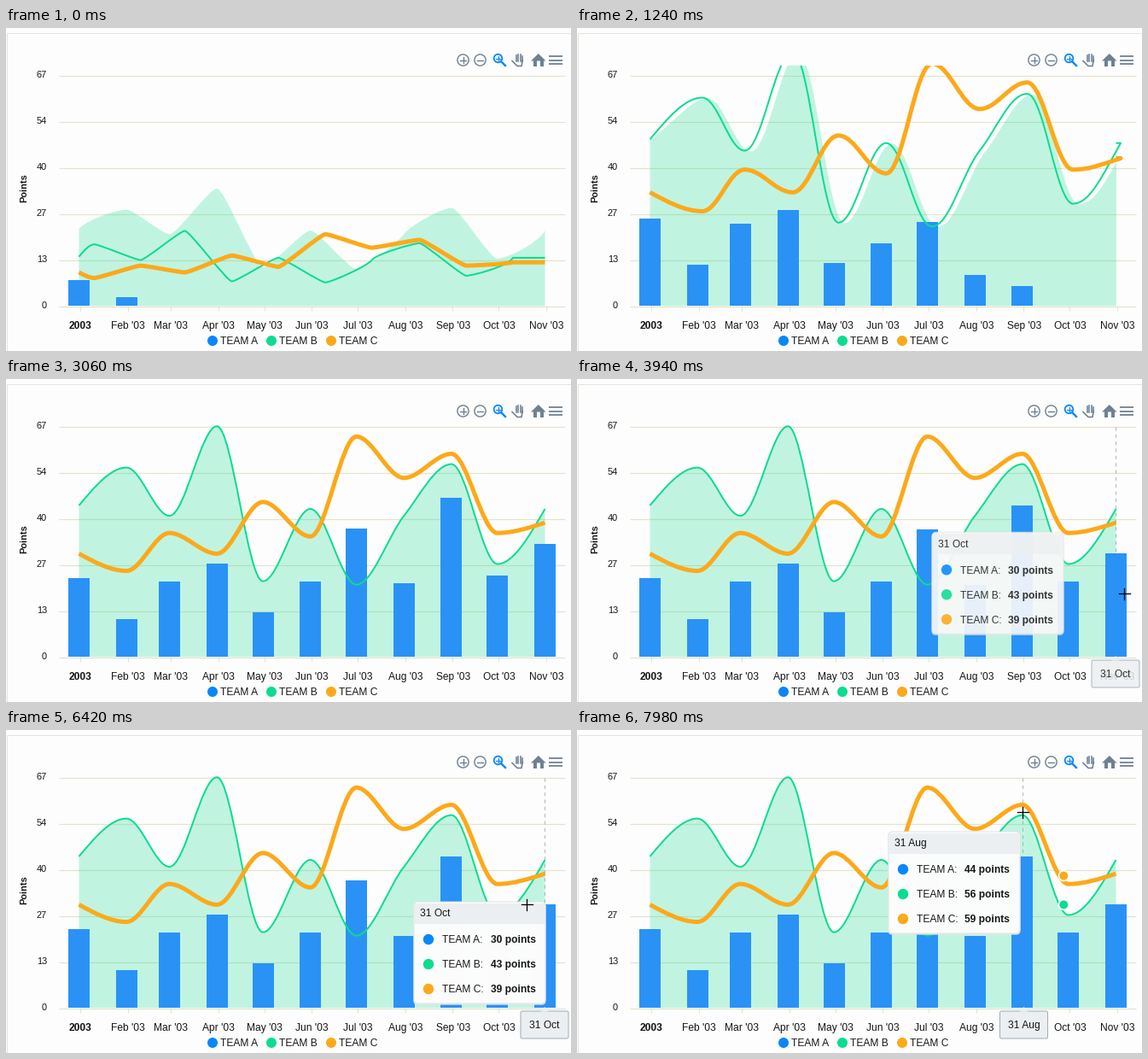
Recreate the animation shown at these times as a matplotlib script. Size 662 by 378 pixels, loop 8 s.

```python
import numpy as np
import matplotlib
matplotlib.rcParams["toolbar"] = "None"
import matplotlib.pyplot as plt
from matplotlib.animation import FuncAnimation
from matplotlib.patches import Circle, FancyBboxPatch, PathPatch, Polygon, Rectangle
from matplotlib.path import Path
from matplotlib.transforms import Affine2D

W, H, DPI = 662, 378, 100
TICK, LOOP = 20, 8000
PX = 72 / DPI
plt.rcParams["font.family"] = "Liberation Sans"

BG, INK, GRID = "#fdfdfd", "#151515", "#e4e4cc"
BLUE, GREEN, ORANGE = COLORS = ("#0787fb", "#0cdc90", "#fca91a")
BAR, ICON = "#2a92f5", "#6e8192"
PANEL, HEAD, EDGE = "#fdfdfd", "#eceff1", "#9dadb8"
NAMES = ("TEAM A", "TEAM B", "TEAM C")

A = np.array([23, 11, 22, 27, 13, 22, 37, 21, 44, 22, 30])
B = np.array([44, 55, 41, 67, 22, 43, 21, 41, 56, 27, 43])
C = np.array([30, 25, 36, 30, 45, 35, 64, 52, 59, 36, 39])
MONTHS = ["2003"] + [m + " '03" for m in "Feb Mar Apr May Jun Jul Aug Sep Oct Nov".split()]
DAYS = [28 + (m + m // 8) % 2 + 2 % m + 2 * (1 // m) for m in range(1, 11)]
X = 85.5 + 1.796 * np.concatenate([[0], np.cumsum(DAYS)])
ZERO, UNIT = 325.3, 270 / 67

fig = plt.figure(figsize=(W / DPI, H / DPI), dpi=DPI, facecolor=BG)
ax = fig.add_axes([0, 0, 1, 1])
ax.set_xlim(0, W)
ax.set_ylim(H, 0)
ax.axis("off")


def text(x, y, s, px=12, ha="left", bold=False, z=2, **kw):
    return ax.text(x, y + 0.36 * px, s, fontsize=px * PX, ha=ha, va="baseline", color=INK,
                   weight="bold" if bold else "normal", zorder=z, **kw)


def line(xs, ys, color, px, z=1, **kw):
    return ax.plot(xs, ys, color=color, lw=px * PX, zorder=z, **kw)[0]


def dot(x, y, r, color, z=2, **kw):
    return ax.add_patch(Circle((x, y), r, fc=color, zorder=z, **kw))


def plus(x, y, r, color, px, z=1):
    return (line([x - r, x + r], [y, y], color, px, z),
            line([x, x], [y - r, y + r], color, px, z))


def height(v):
    return ZERO - UNIT * np.asarray(v, float)


# ---- easing -------------------------------------------------------------
def back_out(u):
    n = np.clip(u, 0, 1) - 1
    s = 1.70158
    return n * n * ((s + 1) * n + s) + 1


S = np.linspace(0, 1, 101)
EASE_X = 0.75 * S * (1 - S) ** 2 + 0.75 * S ** 2 * (1 - S) + S ** 3
EASE_Y = 0.3 * S * (1 - S) ** 2 + 3 * S ** 2 * (1 - S) + S ** 3


def ease(n, start, length=9.5):
    return np.interp((n - start) / length, EASE_X, EASE_Y)


def mix(a, b, k):
    return np.asarray(a, float) * (1 - k) + np.asarray(b, float) * k


# ---- curves -------------------------------------------------------------
def spline(ys):
    """Bezier vertices of a monotone cubic through the points."""
    h = np.diff(X)
    s = np.diff(ys) / h
    m = np.zeros(len(X))
    p = (s[:-1] * h[1:] + s[1:] * h[:-1]) / (h[1:] + h[:-1])
    low = np.minimum(np.minimum(abs(s[:-1]), abs(s[1:])), abs(p) / 2)
    m[1:-1] = (np.sign(s[:-1]) + np.sign(s[1:])) * low
    m[0] = (3 * s[0] - m[1]) / 2
    m[-1] = (3 * s[-1] - m[-2]) / 2
    pts = [(X[0], ys[0])]
    for i, d in enumerate(h):
        pts += [(X[i] + d / 3, ys[i] + m[i] * d / 3),
                (X[i + 1] - d / 3, ys[i + 1] - m[i + 1] * d / 3),
                (X[i + 1], ys[i + 1])]
    return np.array(pts)


def flat(xs):
    """Bezier vertices of a baseline polyline through xs."""
    pts = [(xs[0], ZERO)]
    for a, b in zip(xs, xs[1:]):
        pts += [(a, ZERO), (b, ZERO), (b, ZERO)]
    return np.array(pts)


def bezier(pts, base=()):
    codes = [Path.MOVETO] + [Path.CURVE4] * (len(pts) - 1) + [Path.LINETO] * len(base)
    return Path(np.vstack([pts, *base]), codes)


def padded(pts):
    return np.vstack([pts, [pts[-1]] * 3])


AREA_TO, AREA_FROM = spline(height(B)), flat(X)
# lines start one point behind, so they slide to the right as they rise
LINE_FROM = flat(np.concatenate([[X[0]], X]))
LINES_TO = [padded(spline(height(v))) for v in (B, C)]


def area_path(e):
    pts = mix(AREA_FROM, AREA_TO, e)
    pts[1:, 0] += 130 * max(e - 1, 0)
    return bezier(pts, [(pts[-1, 0], ZERO), (X[0], ZERO)])


# ---- fixed parts --------------------------------------------------------
line([0.5, 0.5, 661.5, 661.5], [H, 5.5, 5.5, H], "#e4e4dc", 1)
rows = 55.5 + 54 * np.arange(6)
ax.hlines(rows, 62, 655, GRID, lw=1.2 * PX, zorder=1)
ax.vlines(X + 1.5, ZERO, ZERO + 6, GRID, lw=PX, zorder=1)
for i, y in enumerate(rows):
    text(48, y - 1, str(int(67 - 13.4 * i + 0.5)), 11, "right")
for i, (x, s) in enumerate(zip(X, MONTHS)):
    text(x + 1.8, 347.8, s, 12, "center", bold=i == 0)
ax.text(21.5, 187, "Points", fontsize=11 * PX, weight="bold", color=INK, rotation=90,
        ha="center", va="center")
for x, color, s in zip((242, 311, 381), COLORS, NAMES):
    dot(x, 366, 6, color, lw=0)
    text(x + 9, 366, s)


def toolbar(y=37.5):
    for x in (535.5, 555.5):
        dot(x, y, 6.6, "none", ec=ICON, lw=1.4 * PX)
        line([x - 3.5, x + 3.5], [y, y], ICON, 1.4)
    line([535.5] * 2, [y - 3.5, y + 3.5], ICON, 1.4)
    dot(576.5, y - 2, 4.8, "none", ec=BLUE, lw=1.8 * PX)
    plus(576.5, y - 2, 2.5, BLUE, 1.2)
    line([580, 585], [y + 1.5, y + 6.5], BLUE, 2.4)
    # hand: four fingers over an open palm
    for i in range(4):
        x = 597.5 + 2.6 * i
        line([x, x], [y - 7 + (i - 1.3) ** 2 * 0.9, y + 1], ICON, 1.6)
    line([593, 599, 604, 605.3], [y + 1, y + 7, y + 7, y], ICON, 1.6)
    # home: roof, walls and door
    ax.add_patch(Polygon([(615, y + 1), (623.8, y - 7.5), (632.5, y + 1)], fc=ICON, lw=0))
    for x in (617.5, 625.8):
        ax.add_patch(Rectangle((x, y), 4.2, 7.5, fc=ICON, lw=0))
    ax.hlines(y + np.array([-4.7, 0, 4.7]), 636, 651.5, ICON, lw=1.8 * PX)


toolbar()

# ---- series -------------------------------------------------------------
hair = line([0, 0], [56, ZERO], "#b6b6bc", 1, 1.5, dashes=(3 / PX, 3 / PX))
area = ax.add_patch(PathPatch(area_path(1), fc=GREEN, alpha=0.25, lw=0, zorder=3))
area.set_clip_path(Rectangle((85, 44), 547, 282, transform=ax.transData))
bars = [ax.add_patch(Rectangle((x - 12.5, ZERO), 25, 0, fc=BAR, lw=0, zorder=4)) for x in X]
plot_box = Rectangle((60, 44), 600, 290, transform=ax.transData)
curves = []
for color, px in ((GREEN, 2), (ORANGE, 5)):
    p = ax.add_patch(PathPatch(bezier(LINES_TO[0]), fc="none", ec=color, lw=px * PX, zorder=5,
                               capstyle="butt", joinstyle="round"))
    p.set_clip_path(plot_box)
    curves.append(p)
markers = [dot(0, 0, 5.8, c, 6, ec="white", lw=1.6 * PX) for c in (GREEN, ORANGE)]

# ---- tooltip and axis tag -----------------------------------------------
tip_at, tag_at = Affine2D(), Affine2D()
tip_tr, tag_tr = tip_at + ax.transData, tag_at + ax.transData


def box(x, y, w, h, r, z, tr, **kw):
    return ax.add_patch(FancyBboxPatch((x + r, y + r), w - 2 * r, h - 2 * r, zorder=z,
                                       boxstyle=f"round,pad={r}", transform=tr, **kw))


panels = [box(-0.6, 0.4, 155.2, 120.2, 5, 8, tip_tr, fc="#e4e8ea", lw=0),
          box(0, 0, 154, 119, 5, 8, tip_tr, fc=PANEL, ec="#e3e3e3", lw=PX),
          ax.add_patch(Rectangle((0.7, 1.5), 152.6, 24, fc=HEAD, lw=0, zorder=8.1,
                                 transform=tip_tr))]
head = text(7, 13, "", z=9, transform=tip_tr)
labels, values = [head], []
for i, color in enumerate(COLORS):
    y = 44 + 29 * i
    labels.append(dot(17, y, 6.2, color, 9, lw=0, transform=tip_tr))
    labels.append(text(33, y, NAMES[i] + ":", z=9, transform=tip_tr))
    values.append(text(89.5, y, "", bold=True, z=9, transform=tip_tr))
labels += values

tag_text = text(0, 345, "", 12, "center", z=7.5, transform=tag_tr)
tag = [box(-28, 329, 56, 32, 2, 7, tag_tr, fc=HEAD, ec=EDGE, lw=PX),
       ax.add_patch(Polygon([(-5, 329.6), (0, 324), (5, 329.6)], fc=HEAD, lw=0, zorder=7.1,
                            transform=tag_tr)), tag_text]
cursor = plus(0, 0, 6.5, "black", 1.3, 12)

SPEED, LAG = 51.5, 0.0757
SHOW, TO_OCT, TO_AUG, MARK_AUG = 79.5, 152, 160, 170
STOPS = ((10, "31 Oct"), (9, "30 Sep"), (8, "31 Aug"))
MOUSE = np.array([(78, 670, 264), (85, 641, 251), (119, 616, 210),
                  (150, 606, 200), (154, 566, 174), (171, 522, 96)])


def step_at(t):
    """Three steps every 140 ms: one held for 100 ms, two for 20 ms."""
    turn, phase = divmod(t, 140)
    return 3 * turn + (phase >= 20) + (phase >= 120)


def grow(n):
    u = 0.13 + n / SPEED
    area.set_path(area_path(back_out(u)))
    lag = LAG * np.maximum(np.arange(len(X)), 0.7)
    for bar, v, k in zip(bars, A, back_out(u - lag)):
        bar.set_y(ZERO - v * UNIT * k)
        bar.set_height(v * UNIT * k)
    for curve, to in zip(curves, LINES_TO):
        curve.set_path(bezier(mix(LINE_FROM, to, back_out(u - lag[0]))))


def hover(n):
    on = n >= SHOW
    for a in panels + labels + tag + [hair]:
        a.set_visible(on)
    for m in markers:
        m.set_visible(n >= TO_OCT)
    if not on:
        return
    i, day = STOPS[(n >= TO_OCT) + (n >= TO_AUG)]
    hair.set_xdata([X[i], X[i]])
    head.set_text(day)
    tag_text.set_text(day)
    for label, data in zip(values, (A, B, C)):
        label.set_text(f"{data[i]} points")

    k_in, k_oct, k_aug = (ease(n, s) for s in (SHOW, TO_OCT, TO_AUG))
    rest = (478, np.interp(n, [135, TO_OCT], [206, 164]))
    pos = mix(mix(mix((0, 0), rest, k_in), (417, 122), k_oct), (365, 119), k_aug)
    tip_at.clear().translate(*pos)
    tag_at.clear().translate(mix(mix(631, 576.5, k_oct), 523.5, k_aug), 0)
    for a in panels:
        a.set_alpha(0.96 * k_in ** 2)
    for a in labels + tag:
        a.set_alpha(k_in)

    k_mark = ease(n, MARK_AUG)
    for m, data in zip(markers, (B, C)):
        nov, octo, aug = [(X[j], height(data[j])) for j in (10, 9, 8)]
        m.center = tuple(mix(mix(nov, octo, k_oct), aug, k_mark))


def point(n):
    x, y = (np.interp(n, MOUSE[:, 0], MOUSE[:, c]) for c in (1, 2))
    cursor[0].set_data([x - 6.5, x + 6.5], [y, y])
    cursor[1].set_data([x, x], [y - 6.5, y + 6.5])


def draw(i):
    n = step_at(i * TICK)
    grow(n)
    hover(n)
    point(n)
    return []


anim = FuncAnimation(fig, draw, frames=LOOP // TICK, interval=TICK, repeat=True,
                     repeat_delay=0, blit=False, cache_frame_data=False)
plt.show()
```
